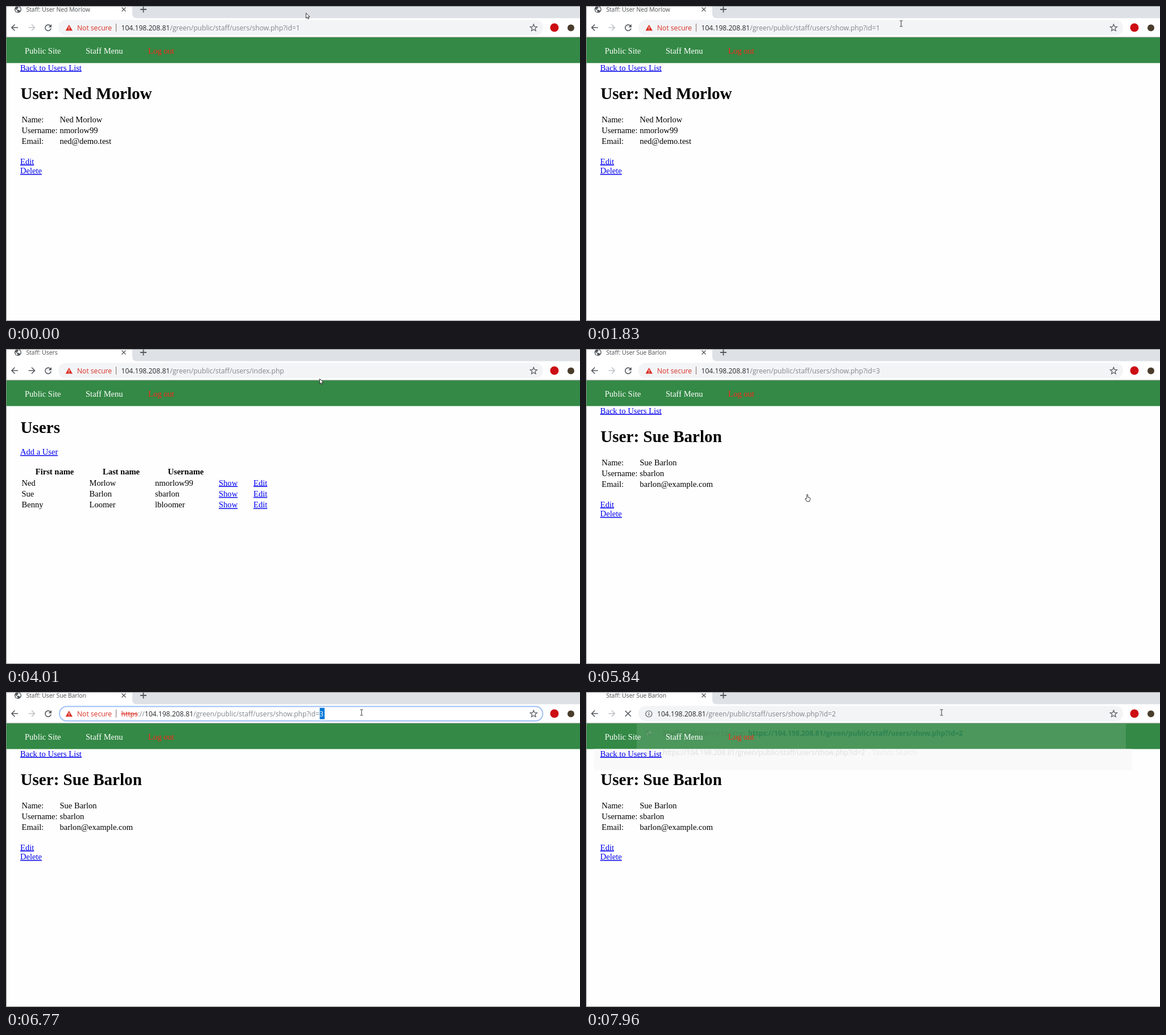
Recreate the animation shown at these times as an HTML page. Size 1009 by 555 pixels, loop 8000 ms.

```html
<!DOCTYPE html>
<html lang="en">
<head>
<meta charset="utf-8">
<title>Staff users</title>
<style>
html, body { margin: 0; height: 100%; overflow: hidden; background: #fff; }
svg { display: block; width: 100vw; height: 100vh; }
text { white-space: pre; }
.ui { font: 12.1px "Open Sans", "Noto Sans", sans-serif; fill: #27292c; }
.doc { font: 14.56px "Liberation Serif", serif; fill: #000; }
.h1 { font-size: 29.1px; font-weight: bold; }
.link { fill: #00e; text-decoration: underline; }
.gray { fill: #80868b; }
.red { fill: #d93025; }
.bold { font-weight: 700; }
.line { fill: none; stroke: #55595e; stroke-width: 1.6; }
</style>
</head>
<body>
<svg id="stage" viewBox="0 0 1009 555"></svg>
<script>
const LOOP = 8000;
const stage = document.getElementById('stage');

const users = [
  { first: 'Ned', last: 'Morlow', login: 'nmorlow99', mail: 'ned@demo.test' },
  { first: 'Sue', last: 'Barlon', login: 'sbarlon', mail: 'barlon@example.com' },
  { first: 'Benny', last: 'Loomer', login: 'lbloomer' }
];
const fullName = u => `${u.first} ${u.last}`;

// Pointer moves: first step, last step, number of steps, target x, y
const moves = [
  [130, 130, 1, 489, 18],
  [410, 870, 4, 110, 122],
  [1150, 1830, 6, 554, 31],
  [1965, 2100, 2, 512, 36],
  [2250, 2522, 3, 150, 120],
  [2658, 2930, 3, 12, 38],
  [3340, 3740, 4, 568, 84],
  [4010, 4010, 1, 551, 52],
  [4150, 4290, 2, 500, 38],
  [4720, 5551, 7, 389, 256],
  [5973, 6370, 4, 560, 37],
  [6505, 6770, 3, 625, 36]
];

function pointerAt(t) {
  let x = 527, y = 12;
  for (const [from, to, steps, tx, ty] of moves) {
    if (t < from) break;
    const step = Math.floor((t - from) / (to - from || 1) * (steps - 1) + 1e-6) + 1;
    const f = Math.min(1, step / steps), ease = f * f * (3 - 2 * f);
    x += (tx - x) * ease;
    y += (ty - y) * ease;
  }
  return [x, y];
}

function sceneAt(t) {
  const address = t < 3473 ? 'show.php?id=1' : t < 5690 ? 'index.php'
    : t < 7800 ? 'show.php?id=3' : 'show.php?id=2';
  return {
    address,
    user: t < 3473 ? users[0] : t < 5840 ? null : users[1],
    canForward: t >= 3473 && t < 5690,
    loading: t >= 5690 && t < 5840 || t >= 7960,
    focused: t >= 6370 && t < 7800,
    selected: t >= 6637 && t < 7800,
    suggesting: t >= 7800 && t < 7960,
    fading: t >= 7960,
    pointer: pointerAt(t)
  };
}

const text = (x, y, str, cls = 'doc', more = '') =>
  `<text x="${x}" y="${y}" class="${cls}" ${more}>${str}</text>`;
const span = (str, cls) => `<tspan class="${cls}">${str}</tspan>`;
const rect = (x, y, w, h, fill, more = '') =>
  `<rect x="${x}" y="${y}" width="${w}" height="${h}" fill="${fill}" ${more}/>`;
const dot = (x, y, r, fill) => `<circle cx="${x}" cy="${y}" r="${r}" fill="${fill}"/>`;
const line = (d, more = '') => `<path class="line" d="${d}" ${more}/>`;

const host = '104.198.208.81';
const folder = '/green/public/staff/users/';

const globe = (x, y) => `<g transform="translate(${x} ${y})">${dot(0, 0, 6.1, '#55595e')}
  <path fill="#fff" d="M-4.8-.8L-1 2.2V4.9Q-4.6 4-4.8-.8ZM.6-4.7Q4.6-3.6 4.8.2L3.4 2.6 1.6.8H-1.6V-1L.3-1.2Z"/></g>`;

function star() {
  let points = '';
  for (let i = 0; i < 10; i++) {
    const r = i % 2 ? 2.8 : 6.4, a = i * Math.PI / 5;
    points += `${927.5 + r * Math.sin(a)},${38.6 - r * Math.cos(a)} `;
  }
  return `<polygon class="line" points="${points}" style="stroke-width:1.2"/>`;
}

function tabStrip(s) {
  const title = s.user ? `Staff: User ${fullName(s.user)}` : 'Staff: Users';
  return rect(0, 0, 1009, 55, '#fff')
    + '<path fill="#dee1e6" d="M222 0H1009V21.500H230Q222 21.500 222 13.500Z"/>'
    + (s.loading ? '' : globe(21, 6))
    + text(35.5, 10, title, 'ui', 'style="font-size:10.4px;fill:#4a4d51"')
    + line('M203.500 2.500l7 7m0-7l-7 7', 'style="stroke-width:1.3"')
    + line('M236 6h11M241.500 .5v11', 'style="stroke-width:1.8"');
}

function toolbar(s) {
  const arrow = 'h11M5.500 -5.500L0 0L5.500 5.500';
  let out = `<g transform="translate(10 38)">${line('M0 0' + arrow)}</g>`
    + `<g transform="translate(50.500 38) scale(-1 1)">${line('M0 0' + arrow,
      s.canForward ? '' : 'style="stroke:#bfc2c6"')}</g>`;
  out += s.loading ? line('M69 33l10 10m0-10l-10 10')
    : line('M78 34.800A5.200 5.200 0 1 0 79.200 39.500') + '<path fill="#55595e" d="M80 32v5.500h-5.500Z"/>';
  out += s.focused
    ? rect(94, 25.5, 849.5, 25.5, '#fff', 'rx="12.700" stroke="#9fc0f5" stroke-width="2"')
    : rect(92, 24.5, 852, 27, '#f3f4f6', 'rx="13"');

  const path = folder + s.address;
  if (s.loading) {
    out += '<circle class="line" cx="110.500" cy="38.500" r="5.500" style="stroke-width:1.2"/>'
      + line('M110.500 37.500v4M110.500 35v1.400', 'style="stroke-width:1.3"')
      + text(125, 43, host + span(path, 'gray'), 'ui');
  } else {
    const scheme = s.focused
      ? '<tspan class="red" text-decoration="line-through">https</tspan>' + span('://', 'gray') : '';
    const tail = s.selected
      ? span(path.slice(0, -1), 'gray') + '<tspan fill="#fff">3</tspan>' : span(path, 'gray');
    out += '<path class="red" d="M110.800 33L117 43.500H104.600Z"/>'
      + line('M110.800 36.500v3.500m0 1v1.300', 'style="stroke:#fff;stroke-width:1.2"')
      + text(125, 43, 'Not secure', 'ui red')
      + rect(193, 31, 1.1, 14, '#8d7474')
      + (s.selected ? rect(551.5, 28, 8.5, 20, '#0078d7') : '')
      + text(202.5, 43, scheme + host + tail, 'ui');
  }
  return out + star() + dot(964, 38, 7.5, '#cc0d14') + dot(993, 38.5, 6, '#4a3d2c');
}

function suggestions() {
  const url = 'https://' + host + folder + 'show.php?id=2';
  return globe(110.5, 72)
    + text(135, 76.5, `${span('Staff', 'bold')}: User ${fullName(users[2])}`, 'ui')
    + text(276, 76.5, '-', 'ui gray')
    + text(285, 76.5, url, 'ui bold', 'style="fill:#1f6fdc"')
    + '<circle class="line" cx="109" cy="105" r="3.800" style="stroke-width:1.3"/>'
    + line('M111.800 107.800l4 4', 'style="stroke-width:1.500"')
    + text(135, 111, url, 'ui')
    + text(496, 111, '- Tavoro Search', 'ui gray');
}

function dropdown(s) {
  return rect(87, 28, 864, 105, '#000', 'rx="9" opacity=".1"')
    + rect(88, 26, 862, 102, '#000', 'rx="8" opacity=".12"')
    + rect(89, 24, 860, 100, '#fff', 'rx="7"')
    + globe(110.5, 38)
    + text(135, 43, span('https://', 'gray') + host + span(folder + s.address, 'gray'), 'ui')
    + rect(492, 29, 1, 18, '#222')
    + suggestions();
}

function navBar(s) {
  return rect(0, 55, 1009, 45.5, '#338945')
    + rect(0, 54.5, 1009, 1, '#8a978d')
    + (s.fading
      ? rect(14, 100.5, 946, 37, '#f9f9f9') + rect(89, 56, 860, 44.5, '#fff', 'opacity=".120"')
        + `<g opacity=".13">${suggestions()}</g>`
        + text(285, 76.5, 'https://' + host + folder + s.address, 'ui bold', 'style="fill:#1c7a3c" opacity=".6"')
      : '')
    + text(33, 84, 'Public Site', 'doc', 'style="fill:#fff"')
    + text(140, 84, 'Staff Menu', 'doc', 'style="fill:#fff"')
    + text(250, 84, 'Log out', 'doc', 'style="fill:#fb2418"');
}

function userPage(u) {
  const rows = [['Name:', fullName(u)], ['Username:', u.login], ['Email:', u.mail]];
  return text(25, 113.5, 'Back to Users List', 'doc link')
    + text(25.5, 163.5, `User: ${fullName(u)}`, 'doc h1')
    + rows.map(([label, value], i) =>
      text(27.5, 204.5 + i * 19.4, label) + text(94.5, 204.5 + i * 19.4, value)).join('')
    + text(25, 278.5, 'Edit', 'doc link')
    + text(25, 295, 'Delete', 'doc link');
}

function listPage() {
  const heads = [[85.5, 'First name'], [202.5, 'Last name'], [316, 'Username']];
  return text(25.5, 147.5, 'Users', 'doc h1')
    + text(25, 186, 'Add a User', 'doc link')
    + heads.map(([x, str]) => text(x, 221, str, 'doc bold', 'text-anchor="middle"')).join('')
    + users.map((u, i) => {
      const y = 240.5 + i * 19.4;
      return text(27.5, y, u.first) + text(146.5, y, u.last) + text(262, y, u.login)
        + text(374, y, 'Show', 'doc link') + text(435, y, 'Edit', 'doc link');
    }).join('');
}

function pointer([x, y]) {
  const overAddress = y > 23 && y < 52 && x > 92 && x < 920;
  const overShow = y > 247 && x > 373 && x < 408;
  const shape = overAddress
    ? line('M-2.500-5H-.7L0-4.500.7-5H2.500M0-4.500V4.500M-2.500 5H-.7L0 4.500.7 5H2.500', 'style="stroke:#333;stroke-width:1"')
    : `<path fill="#fff" stroke="#222" stroke-width=".9" stroke-linejoin="round" d="${overShow
      ? 'M-1 7.500V1Q0-.5 1 1V5L4.500 6Q5.500 6.500 5 9L4 12.500H-.8L-3.800 8Q-3.500 6.200-1 8.500'
      : 'M.4 .4V9.500L2.500 7.600 4 11 5.500 10.300 4 7.100H7Z'}"/>`;
  return `<g transform="translate(${x.toFixed(1)} ${y.toFixed(1)})">${shape}</g>`;
}

function draw(s) {
  return rect(0, 0, 1009, 555, '#fefefe')
    + tabStrip(s) + toolbar(s) + navBar(s)
    + (s.user ? userPage(s.user) : listPage())
    + (s.suggesting ? dropdown(s) : '')
    + '<path fill="none" stroke="#8c8c8c" d="M1009 .5H.5V554.500H1009"/>'
    + pointer(s.pointer);
}

let shown = '';
function tick() {
  const scene = sceneAt(performance.now() % LOOP);
  const key = JSON.stringify(scene);
  if (key !== shown) {
    shown = key;
    stage.innerHTML = draw(scene);
  }
  requestAnimationFrame(tick);
}
tick();
</script>
</body>
</html>
```
